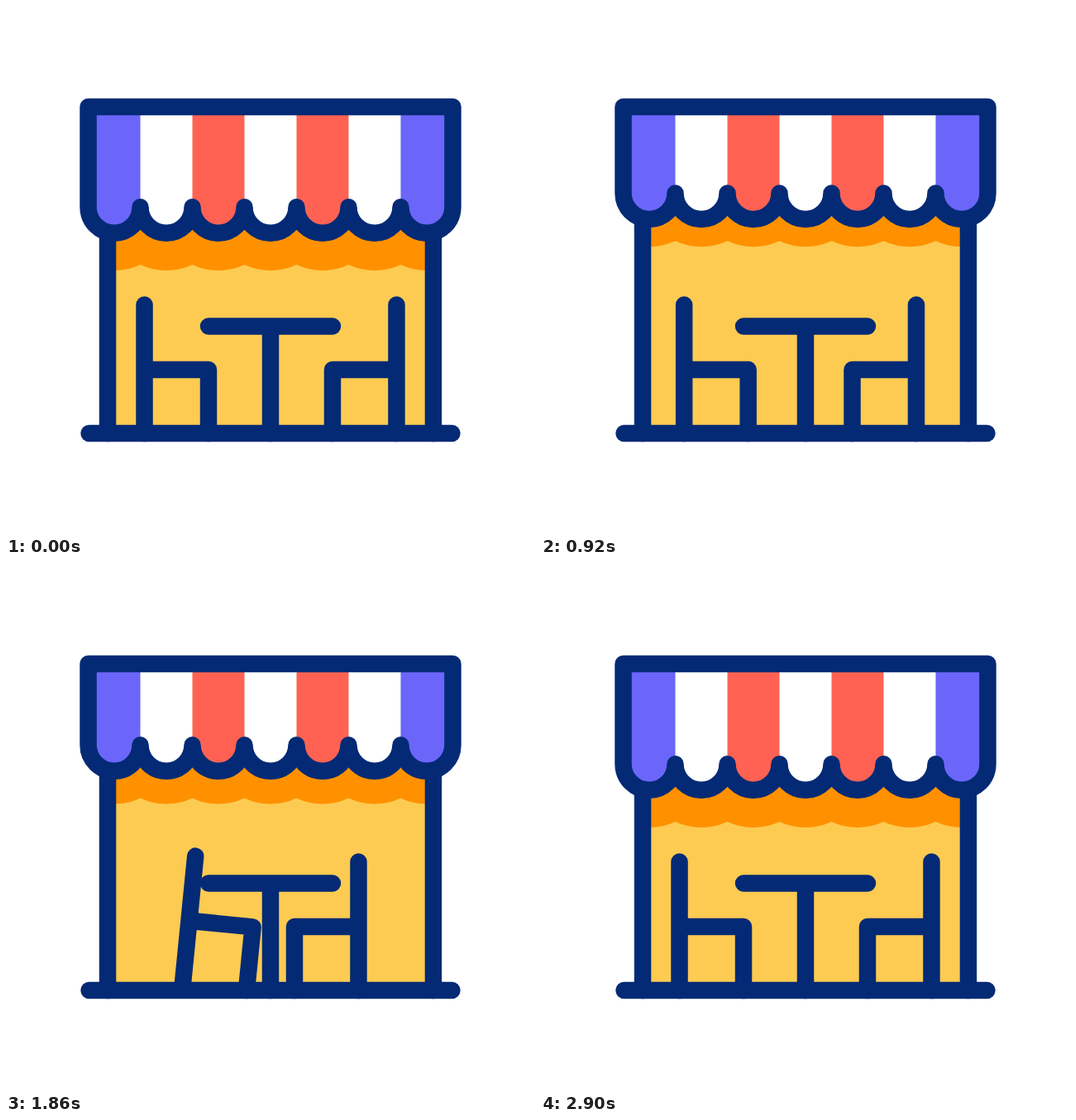
Write an HTML page that moves like this. It is 640 px wide and 640 px high and loops after 3.6 s.

```html
<!DOCTYPE html>
<html lang="en">
<head>
<meta charset="utf-8">
<style>
  html, body { margin: 0; width: 100%; height: 100%; overflow: hidden; background: #fff; }
  svg { display: block; width: 100%; height: 100%; }
  .line { fill: none; stroke: #042a75; stroke-width: 20.5; stroke-linecap: round; stroke-linejoin: round; }
</style>
</head>
<body>
<svg viewBox="0 0 640 640">
  <defs>
    <clipPath id="wall"><path d="M123 132H517V517H123Z"/></clipPath>
    <clipPath id="cloth"><path id="clothShape"/></clipPath>
    <path id="chair" d="M167.5 361.5V517M167.5 440H245V517"/>
  </defs>
  <path d="M123 132H517V517H123Z" fill="#fdcb52"/>
  <path id="shadow" fill="#ff9100" clip-path="url(#wall)"/>
  <path class="line" d="M123 150V517M517 150V517M245 387.5H395M320 387.5V517"/>
  <g class="line">
    <use id="left" href="#chair"/>
    <g transform="translate(640 0) scale(-1 1)"><use id="right" href="#chair"/></g>
  </g>
  <path class="line" d="M100.5 517H539.5"/>
  <g id="stripes" clip-path="url(#cloth)"><path d="M90 112H550V500H90Z" fill="#fff"/></g>
  <path id="edge" class="line"/>
</svg>
<script>
const LOOP = 3600, REST = 2900, LEFT = 99.5, PITCH = 63, COUNT = 7, TOP = 122;
const $ = id => document.getElementById(id);

// Smooth 0 to 1 between two times; warp < 1 gives a quick start and a slow end
function ramp(t, from, to, warp = 1) {
  const p = Math.min(1, Math.max(0, (t - from) / (to - from))) ** warp;
  return (1 - Math.cos(Math.PI * p)) / 2;
}

// Turning points of the awning's swing: [time, offset]
const swing = [[0, 0], [560, 48], [1240, -70], [1500, 21], [2020, -35], [2400, 15], [2700, 0]];
const drop = t => swing.slice(1).reduce((y, [end, offset], i) =>
  y + (offset - swing[i][1]) * ramp(t, swing[i][0], end), 0);

// Outline with a straight top and a row of hanging arcs
const scallops = (y, r) =>
  `M${LEFT} ${TOP}V${y}` + `a${r} ${r} 0 0 0 ${PITCH} 0`.repeat(COUNT) + `V${TOP}Z`;

for (let i = 0; i < COUNT; i += 2) {
  const color = i % (COUNT - 1) ? '#ff6252' : '#6b66f9';
  $('stripes').innerHTML +=
    `<rect x="${LEFT + i * PITCH}" y="${TOP}" width="${PITCH}" height="240" fill="${color}"/>`;
}

// Back off, slide to the table, tip against it, drop, return
function moveChair(id, t, { arrive, fall, leave, warp }) {
  const shift = -12.5 * ramp(t, 0, 620) + 58.5 * ramp(t, 620, arrive) - 46 * ramp(t, leave, REST, warp);
  const tilt = 7.2 * (ramp(t, arrive - 220, arrive - 40) - ramp(t, fall, fall + 200));
  $(id).setAttribute('transform', `translate(${shift} 0) rotate(${tilt} 245 517)`);
}

function draw(now) {
  const t = now % LOOP;
  const cloth = scallops(243.3 + drop(t), PITCH / 2);
  $('clothShape').setAttribute('d', cloth);
  $('edge').setAttribute('d', cloth);
  // The shade runs slightly ahead of the cloth
  const lead = Math.min(45, t / 4);
  $('shadow').setAttribute('d', scallops(313 + drop(t + lead), 74));
  moveChair('left', t, { arrive: 1420, fall: 1800, leave: 1940, warp: .47 });
  moveChair('right', t, { arrive: 1200, fall: 1620, leave: 1860, warp: .73 });
}

const start = performance.now();
function tick() {
  draw(performance.now() - start);
  requestAnimationFrame(tick);
}
tick();
</script>
</body>
</html>
```
